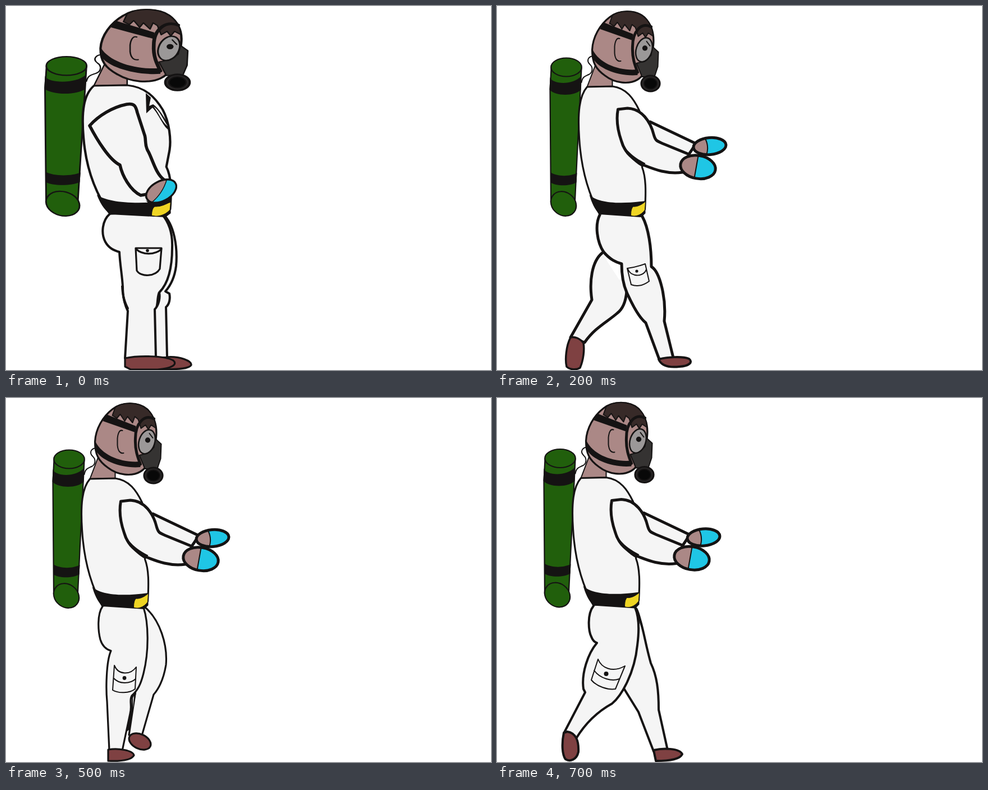
An HTML page that plays this animation: 864 by 648 pixels, repeating every 800 ms.

```html
<!DOCTYPE html>
<html lang="en">
<head>
<meta charset="utf-8">
<title>Walking worker</title>
<style>
  html, body { margin: 0; width: 100%; height: 100%; overflow: hidden; background: #fff; }
  svg { display: block; width: 100vw; height: 100vh; }
  path, ellipse, circle { stroke: #151313; stroke-width: 3.2; stroke-linejoin: round; stroke-linecap: round; }
  .suit { fill: #f5f5f5; }
  .skin { fill: #ab8886; }
  .tank { fill: #215f0c; stroke-width: 2.2; }
  .shoe { fill: #7f4142; }
  .glove { fill: #1fc6e5; }
  .black { fill: #151313; stroke: none; }
  .line { fill: none; }
  .thin { stroke-width: 2; }
  .bold > path { stroke-width: 5; }
  .mid > path { stroke-width: 4; }
  .bold > .thin, .mid > .thin { stroke-width: 2; }
  .pose { visibility: hidden; animation: show 800ms step-end infinite; animation-delay: calc((var(--i) - 8) * 100ms); }
  @keyframes show {
    0% { visibility: visible; }
    12.5%, 100% { visibility: hidden; }
  }
</style>
</head>
<body>
<svg viewBox="0 0 864 648">
  <defs>
    <g id="upper">
      <!-- air tank -->
      <path class="tank" d="M86 110L84 150L85.500 350L108 362L128.500 346L132 272L138 152L140 110Z"/>
      <ellipse class="tank" cx="113" cy="109" rx="27.3" ry="16.5"/>
      <path class="black" d="M84 127C88 140 126 141 139 125V149C128 161 94 161 83 149Z"/>
      <path class="black" d="M85 296C96 304 120 304 132 297L131 314C120 321 94 321 85 314Z"/>
      <ellipse class="tank" cx="108" cy="352" rx="24" ry="20.3" transform="rotate(38 108 352)"/>
      <path class="line thin" d="M163 89C152 89 148 97 155 104C161 109 160 119 153 122C147 125 142 125 140 136"/>
      <!-- head -->
      <path class="skin thin" d="M166 102L150 144L195 143V122Z"/>
      <path class="skin" d="M159 78C160 55 173 33 190 20C206 7 236 6 252 20C265 33 270 50 268 70C266 100 252 124 240 131C225 140 200 138 182 124C165 112 159 100 159 78Z"/>
      <path fill="#372a28" class="thin" d="M195 17C208 7 236 6 252 20C262 29 267 42 268 54L259 48L254 56L249 48L241 54L236 38L230 33L226 44L217 33L212 41L204 29L198 36L190 31Z"/>
      <path class="black" d="M179 29L232 50L230 61L173 41Z"/>
      <path class="black" d="M160 78C172 102 206 116 240 113V123C206 126 170 111 161 94Z"/>
      <path class="line thin" d="M208 58C203 56 200 62 199 72V84C200 95 204 99 210 98"/>
      <path class="line" style="stroke-width:5" d="M264 37C246 28 231 46 231 72C230 92 235 105 240 118"/>
      <!-- mask -->
      <path fill="#353332" class="thin" d="M266 72L277 82L276 108L270 126H248L238 102L253 98L264 88Z"/>
      <ellipse fill="#9b9898" cx="251.5" cy="78" rx="14" ry="22" transform="rotate(17 251.5 78)" style="stroke-width:2.5"/>
      <circle class="black" cx="253" cy="75" r="4.7"/>
      <path class="line thin" d="M256 63L262 71"/>
      <ellipse fill="#292727" cx="263" cy="138" rx="16.5" ry="14"/>
      <ellipse fill="#080808" cx="263" cy="138" rx="11.5" ry="9.8" class="thin"/>
      <!-- torso and belt -->
      <path class="suit" d="M150 144L195 143C220 146 233 165 243 186C252 208 255 240 252 260L248 287C255 305 255 330 253 362L172 370C150 330 139 285 136 235C133 190 136 160 150 144Z"/>
      <path class="black" d="M154 336C168 350 205 354 254 347V369L247 376L172 371C163 361 158 350 154 336Z"/>
      <path fill="#efd524" class="thin" style="stroke-width:1" d="M232 357C240 358 248 353 254 348L253 363C246 373 235 376 228 373C228 365 229 360 232 357Z"/>
    </g>

    <g id="arms" class="bold">
      <path class="suit" d="M262 206L344 245L330 266L275 262"/>
      <path class="suit" d="M320 296C290 300 268 290 245 281C225 267 216 258 211 240C204 220 202 200 205 184L222 182C247 183 263 205 269 230C272 240 274 240 285 245L329 263"/>
      <path class="black" d="M214 247C225 262 235 270 254 280L249 287C232 277 220 264 214 247Z"/>
      <g transform="translate(368.5 249.5) rotate(-5)">
        <ellipse class="skin" rx="29" ry="15"/>
        <path class="glove thin" d="M-7 -14.5A29 15 0 1 1 -7 14.5Q-1 0 -7 -14.5Z"/>
        <ellipse class="line" rx="29" ry="15" style="stroke-width:5"/>
      </g>
      <g transform="translate(347.5 286.7) rotate(10)">
        <ellipse class="skin" rx="31.500" ry="20.500"/>
        <path class="glove thin" d="M-3 -20.400A31.500 20.500 0 1 1 -3 20.400Z"/>
        <ellipse class="line" rx="31.500" ry="20.500" style="stroke-width:5"/>
      </g>
    </g>

    <g id="body"><use href="#upper"/><use href="#arms"/></g>
    <path id="heel" class="shoe" d="M287 627C298 602 325 589 343 594C352 602 345 622 325 636C312 646 295 650 288 645Z"/>
    <path id="toe" class="shoe" d="M130 592C128 610 134 635 148 647L168 649C176 638 166 606 151 600C142 594 136 592 130 592Z"/>
  </defs>

  <!-- standing -->
  <g class="pose" style="--i:0">
    <g class="mid">
      <path class="suit" d="M279 370C300 388 306 430 303 463C300 487 291 500 284 508L291 512C293 521 291 531 285 536L287 626H262L265 500"/>
      <path class="suit" d="M185 370C171 382 169 405 177 420C183 431 192 435 202 438C203 460 207 480 208 500C208 520 213 535 217 543L212 627H267L265 540C272 533 275 520 273 510C290 493 296 462 296 430C297 405 290 385 278 371"/>
      <path class="black" d="M205 498C206 520 210 532 217 544L219 538C212 524 210 514 208 498ZM271 509C277 515 276 530 265 540C269 530 267 520 271 509Z"/>
      <path class="shoe" style="stroke-width:3.2" d="M286 625C310 623 331 632 330 639C327 646 305 647 278 647"/>
      <path class="shoe" style="stroke-width:3.2" d="M212 627C235 622 282 622 298 631C306 638 296 645 270 647H222L212 642Z"/>
      <path class="line" style="stroke-width:3.2" d="M231 431H277L274 468C266 482 240 483 233 471ZM232 433C244 444 265 443 277 433"/>
      <circle class="black" cx="252" cy="435.5" r="2.8"/>
    </g>
    <use href="#upper" transform="matrix(1.318 0 0 1.009 -41.2 -3.3)"/>
    <path class="black" d="M249 155L258 163L255 178L262 175C272 181 282 199 291 213L289 220C280 215 272 192 261 181L250 191Z"/>
    <path class="suit" style="stroke:none" d="M263 179C273 185 280 202 288 214C279 208 273 192 263 179Z"/>
    <path class="suit" style="stroke:none" d="M149 214L240 195L290 312L242 338L203 283Z"/>
    <path class="suit" style="stroke-width:5.6" d="M281 309C267 298 262 276 254 260C246 248 250 238 247 230L234 190C231 177 228 173 215 175C190 180 165 195 149 213C162 238 184 274 203 283C207 302 221 328 240 337L252 335"/>
    <path class="black" d="M249 346C262 353 283 350 293 341V350L260 358Z"/>
    <g transform="translate(276.5 329.5) rotate(-28)">
      <ellipse class="skin" rx="29" ry="17.500"/>
      <path class="glove" style="stroke-width:1.5" d="M18.500 -13.500A29 17.500 0 1 1 -24 9.800Q0 5 18.500 -13.500Z"/>
      <ellipse class="line" rx="29" ry="17.500"/>
    </g>
  </g>

  <!-- near heel lands -->
  <g class="pose" style="--i:1">
    <g class="bold">
      <path class="suit" d="M180 436C164 452 154 490 164 523L130 592L155 606C170 583 190 570 201 556C212 545 216 520 216 508"/>
      <path class="suit" d="M172 372C158 387 162 415 178 436C190 450 200 453 207 459C205 480 210 495 217 512C230 540 245 552 257 560L287 628L306 602L285 551C290 520 280 465 264 458C270 430 266 385 246 375"/>
      <use href="#toe"/>
      <use href="#heel"/>
      <path class="line thin" d="M220 474Q240 471 256 460L268 502C255 510 243 513 232 511ZM220 475C232 495 255 492 260 475"/>
      <circle class="black" cx="240.500" cy="479.500" r="3.5"/>
    </g>
    <use href="#body"/>
  </g>

  <!-- near foot flat -->
  <g class="pose" style="--i:2">
    <g class="bold">
      <path class="suit" d="M187 440C169 455 164 490 169 523L131 590L156 599C175 572 197 562 214 547C226 538 230 520 231 508"/>
      <path class="suit" d="M183 372C174 390 178 420 190 438C202 452 212 456 222 459C222 480 226 500 233 514C245 540 256 557 265 564L289 629L314 626L298 561C302 520 290 473 275 464C275 430 270 395 259 375"/>
      <path class="shoe" d="M131 590C123 605 121 630 124 642C130 648 142 648 148 644C154 630 156 612 154 600C148 592 139 588 131 590Z" style="stroke-width:3.5"/>
      <path class="shoe" d="M288 629C302 625 330 623 342 628C350 634 342 641 325 642C307 644 293 641 288 629Z" style="stroke-width:4"/>
      <path class="line thin" d="M232 467Q248 465 264 459L271 490C260 498 249 500 239 496ZM233 468C239 484 262 482 266 469"/>
      <circle class="black" cx="249" cy="472" r="2.6"/>
    </g>
    <use href="#body" x="10.500"/>
  </g>

  <!-- far foot lifts -->
  <g class="pose" style="--i:3">
    <g class="mid">
      <path class="suit" d="M195 440C185 460 183 500 190 525L131 572L150 592C180 575 215 560 235 545C250 535 258 520 262 500L230 440"/>
      <path class="suit" d="M183 371C172 385 173 410 181 428C189 442 200 446 208 450C208 480 211 510 217 528L234 552L246 626L280 624L271 551C277 535 275 515 273 500C272 470 270 440 268 420C267 400 263 385 259 375"/>
      <path class="shoe" d="M131 571C121 582 118 604 122 622C130 630 142 628 147 623C151 608 150 592 148 586C143 578 137 572 131 571Z"/>
      <path class="shoe" d="M246 627C260 621 292 620 306 628C314 635 305 643 288 645H247Z"/>
      <path class="line thin" d="M219 467C232 474 246 472 257 463L260 499C248 506 234 507 223 501ZM219 477C231 488 250 486 258 477"/>
      <circle class="black" cx="239" cy="477" r="2.7"/>
    </g>
    <use href="#body" x="10.500"/>
  </g>

  <!-- passing -->
  <g class="pose" style="--i:4">
    <g>
      <path class="suit" d="M260 374C285 394 295 440 290 470C285 493 276 498 252 523L230 470"/>
      <path class="suit" d="M202 514L165 536L131 551L145 580L209 544"/>
      <path class="suit" d="M183 371C171 382 169 405 176 420C182 433 189 438 194 442L202 535L208 545L204 624L244 621V540C251 532 252 522 250 512C262 485 268 450 267 420C267 400 264 385 258 375"/>
      <path class="shoe" d="M131 550C122 558 117 580 121 597C128 605 138 608 142 603C147 585 142 562 131 550Z"/>
      <path class="shoe" d="M203 625C220 617 255 616 270 625C278 633 272 640 252 646H206Z"/>
      <path class="line thin" d="M207 466C218 477 238 477 250 466L249 505C238 512 220 512 209 504ZM207 484C218 493 240 492 249 485"/>
      <circle class="black" cx="228.500" cy="482" r="3"/>
    </g>
    <use href="#body" x="10.500"/>
  </g>

  <!-- far leg swings -->
  <g class="pose" style="--i:5">
    <g>
      <path class="suit" d="M246 371C275 395 288 440 285 475C280 505 270 520 263 528L242 601L219 600L231 520"/>
      <path class="suit" d="M172 371C162 385 164 415 168 430C172 443 180 448 187 450C178 470 178 520 180 540L184 628H207L221 562C225 548 219 538 224 530C235 520 240 510 245 490C255 450 254 400 245 373"/>
      <path class="black" d="M224 530L232 524L220 590L215 594L223 556Z"/>
      <path class="suit" style="stroke:none" d="M226 534L228 530L226 552Z"/>
      <path class="shoe" d="M182 626C200 623 226 627 228 636C224 644 208 647 182 646Z"/>
      <ellipse class="shoe" cx="238.500" cy="611.500" rx="20.500" ry="13" transform="rotate(25 238.5 611.5)"/>
      <path class="line thin" d="M193 476C200 493 221 494 232 479L230 518C220 526 200 526 190 520ZM192 499C201 509 220 510 231 500"/>
      <circle class="black" cx="211" cy="498.500" r="3.4"/>
    </g>
    <use href="#body" x="-.5"/>
  </g>

  <!-- far heel lands -->
  <g class="pose" style="--i:6">
    <g class="mid">
      <path class="suit" d="M246 372C265 400 272 430 279 470C287 495 287 520 285 552L306 602L287 628L255 560L224 518"/>
      <path class="suit" d="M172 371C160 385 163 415 168 428C171 436 176 439 180 441C164 460 154 494 162 523L130 592L155 606C170 580 192 562 208 546C225 530 245 490 250 440C254 410 253 390 246 373"/>
      <use href="#toe"/>
      <use href="#heel"/>
      <path class="line thin" d="M183 470C191 483 210 488 229 478L218 519C203 523 186 517 175 508ZM177 489C188 503 208 506 223 500"/>
      <circle class="black" cx="200" cy="494" r="3.6"/>
    </g>
    <use href="#body" x="-.5"/>
  </g>

  <!-- far foot flat -->
  <g class="pose" style="--i:7">
    <g class="mid">
      <path class="suit" d="M246 372C260 400 262 430 274 472C285 495 288 520 288 555L304 627L279 629L252 559L226 517"/>
      <path class="black" d="M244 372L250 374C256 386 258 400 261 420L254 400Z"/>
      <path class="suit" d="M172 370C160 385 163 415 168 425C171 433 175 435 178 436C162 455 150 490 154 518L157 524L120 595L141 606C160 575 185 555 205 544C222 530 245 490 250 440C254 410 253 390 246 373"/>
      <path class="shoe" d="M119 596C115 615 116 635 122 643C130 648 142 644 145 630C146 610 140 596 125 594Z"/>
      <path class="shoe" d="M279 627C295 623 325 623 330 634C326 643 310 646 283 646Z"/>
      <path class="line thin" d="M180 465C186 480 205 490 228 477L211 518C198 520 178 514 168 502ZM173 485C184 500 205 505 218 500"/>
      <circle class="black" cx="194.500" cy="491" r="4"/>
    </g>
    <use href="#body" x="-.5" y="-1.5"/>
  </g>
</svg>
</body>
</html>
```
